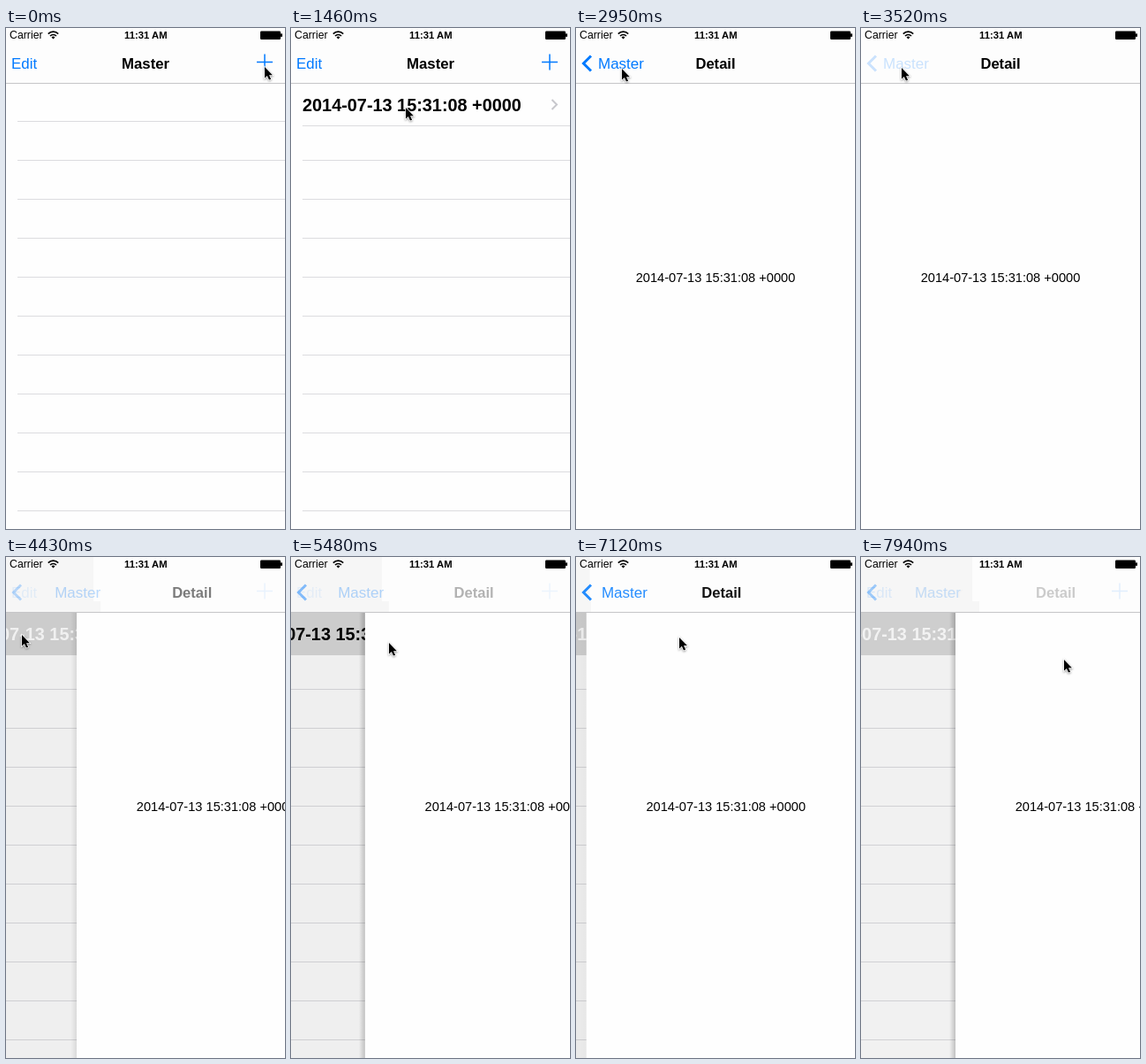
These frames come from a looping animation (316 px wide and 566 px high, 8 s). An HTML page:

```html
<!DOCTYPE html>
<html lang="en">
<head>
<meta charset="utf-8">
<title>Master and detail</title>
<style>
  html, body { margin: 0; width: 100%; height: 100%; overflow: hidden; background: #fefefe; }
  svg { display: block; width: 316px; height: 566px; }
  text { font-family: "Liberation Sans", Arial, sans-serif; white-space: pre; }
  .bold { font-weight: bold; }
  .blue { fill: #007aff; }
  .stroke { fill: none; stroke: #007aff; }
</style>
</head>
<body>
<svg viewBox="0 0 316 566">
  <defs>
    <linearGradient id="fade">
      <stop offset="0" stop-opacity="0"/>
      <stop offset="1" stop-opacity=".2"/>
    </linearGradient>
  </defs>

  <g id="list">
    <rect width="316" height="566" fill="#fefefe"/>
    <g id="lines" fill="#dcdcdf"></g>
    <g id="row">
      <rect id="mark" y="62" width="316" height="49" fill="#d9d9d9"/>
      <text id="stamp" class="bold" x="13" y="94" font-size="19.87">2014-07-13 15:31:08 +0000</text>
      <path d="M295.5 81l5.5 5.5-5.5 5.5" fill="none" stroke="#c7c7cc" stroke-width="2"/>
    </g>
  </g>
  <rect id="dim" width="316" height="566"/>

  <g id="page">
    <rect id="shadow" x="-7" width="7" height="566" fill="url(#fade)"/>
    <rect width="316" height="566" fill="#fefefe"/>
    <text x="67.7" y="287" font-size="14.6">2014-07-13 15:31:08 +0000</text>
  </g>

  <rect width="316" height="62" fill="#fdfdfd"/>
  <path id="tint" fill="#f6f6f6"/>
  <rect y="62" width="316" height="1" fill="#c6c6c8"/>

  <text x="4" y="12.3" font-size="12.3">Carrier</text>
  <path d="M47.8 6.6a8 8 0 0 1 11.4 0M50 9a5 5 0 0 1 7 0" fill="none" stroke="#000" stroke-width="1.7"/>
  <path d="M53.5 12.6l-2-2.2a2.8 2.8 0 0 1 4 0z"/>
  <text class="bold" x="134" y="12.2" font-size="11.3">11:31 AM</text>
  <rect x="288" y="3.5" width="23" height="9.5" rx="1.2"/>
  <rect x="311" y="6.3" width="2" height="3.6" rx=".7"/>

  <text id="edit" class="blue" x="6" y="46" font-size="16.9">Edit</text>
  <path id="plus" class="stroke" stroke-width="1.5" d="M284 38.5h18M293 29.5v18"/>
  <path id="chevron" class="stroke" stroke-width="3" d="M17 31.5L8.5 40l8.5 8.5"/>
  <text id="title" class="bold" y="46" font-size="16.8">Master</text>
  <text id="back" class="blue" y="46" font-size="17">Master</text>
  <text id="detail" class="bold" y="46" font-size="16.6" text-anchor="middle">Detail</text>

  <path id="cursor" d="M0 0v14l3.2-3 2.3 5.2 2.4-1-2.3-5h4.3z" stroke="#fff" stroke-width="1.6"
        paint-order="stroke" style="filter:drop-shadow(0 1px 1px #0006)"/>
</svg>

<script>
const LOOP = 8000, W = 316, SLIDE = 500;
const el = {};
document.querySelectorAll('[id]').forEach(e => el[e.id] = e);
const set = (e, attrs) => { for (const k in attrs) e.setAttribute(k, attrs[k]); };
const clamp = v => Math.min(1, Math.max(0, v));
const ramp = (t, a, b) => clamp((t - a) / (b - a));
const smooth = v => v * v * (3 - 2 * v);
const ease = t => 1 - (1 - clamp(t / SLIDE)) ** 5;

const lines = Array.from({ length: 11 }, () => {
  const r = document.createElementNS('http://www.w3.org/2000/svg', 'rect');
  set(r, { x: 13, width: W, height: 1 });
  return el.lines.appendChild(r);
});

// Interpolates rows of [time, ...values].
function track(keys, t, curve = v => v) {
  const i = keys.findIndex(k => k[0] > t);
  if (i < 0) return keys[keys.length - 1].slice(1);
  if (!i) return keys[0].slice(1);
  const a = keys[i - 1], b = keys[i], f = curve(ramp(t, a[0], b[0]));
  return a.slice(1).map((v, j) => v + (b[j + 1] - v) * f);
}

const POINTER = [
  [0, 293, 44], [600, 293, 44], [1100, 130, 90], [1460, 130, 90], [1900, 72, 86],
  [2100, 70, 84], [2230, 59, 47], [2600, 52, 46], [2950, 52, 46], [3400, 46, 45],
  [3640, 46, 45], [4140, 18, 88], [5180, 18, 88], [5480, 111, 97], [5760, 234, 109],
  [6060, 234, 109], [6061, 235, 109], [6230, 235, 109], [6470, 173, 88], [6930, 173, 88],
  [7400, 18, 96], [7560, 18, 96], [7940, 230, 116]
];
const SWIPE = [[5180, 0], [5480, 83], [5600, 190], [5700, 270], [5820, W]];
const SWIPE_AGAIN = [[7600, 0], [7760, 24], [7940, 107]];

// How far the detail screen is in, 0 to 1; the bar runs on its own start times.
function progress(t, first, second) {
  if (t < first) return 0;
  if (t < 3640) return ease(t - first);
  if (t < second) return 1 - ease(t - 3640);
  if (t < 5180) return ease(t - second);
  if (t < 5820) return 1 - track(SWIPE, t)[0] / W;
  if (t < 6880) return 0;
  if (t < 7600) return ease(t - 6880);
  return 1 - track(SWIPE_AGAIN, t)[0] / W;
}

const isPush = t => t < 3640 || t >= 4310 && t < 5180 || t >= 6820 && t < 7600;
const isPop = t => t >= 3640 && t < 4310 || t >= 5180 && t < 6820;

function selection(t) {
  if (t < 2060) return 0;
  if (t < 4310) return 1 - ramp(t, 3700, 4140);
  if (t < 6820) return 1 - ramp(t, 5500, 5820);
  return 1;
}

function drawList(t, p) {
  const grow = 5 * smooth(ramp(t, 530, 830));
  lines.forEach((r, i) => set(r, { y: 105 + 44 * i + (!i || t < 1040 ? grow : 0) }));
  const sel = selection(t);
  set(el.row, { opacity: ramp(t, 530, 800) });
  set(el.mark, { opacity: sel });
  set(el.stamp, { fill: sel && !isPop(t) ? '#fff' : '#000' });
  set(el.list, { transform: `translate(${-0.3 * W * p})` });
  set(el.dim, { opacity: 0.08 * p });
}

function drawBar(t, p, x) {
  const push = isPush(t);
  const press = t >= 3460 && t < 3640 ? 0.2 : 1;
  const left = 131 - 106 * p;
  const out = (1 - p) ** 2;
  set(el.title, { x: left, opacity: out * out });
  set(el.back, { x: left, opacity: p ** 4 * press });
  set(el.chevron, { opacity: p ** (push ? 4 : 2.5) * press });
  set(el.detail, { x: 158 + 185 * (1 - p), opacity: p ** (push ? 2 : 4) });
  set(el.edit, { opacity: out });
  set(el.plus, { opacity: out * (t >= 470 && t < 600 ? 0.3 : 1) });
  const grow = clamp(x / 60), edge = x + 19 * grow;
  set(el.tint, { d: `M0 0H${edge}V50H${edge + 8 * grow}V62H0z`, opacity: clamp(p * 1.4) });
}

function draw(t) {
  const p = progress(t, 2141, 4311), x = W * (1 - p);
  drawList(t, p);
  drawBar(t, progress(t, 2123, 4320), x);
  set(el.page, { transform: `translate(${x})`, visibility: p > 0 ? 'visible' : 'hidden' });
  set(el.shadow, { opacity: clamp(x / 80) * (isPush(t) ? 0.45 : 1) });
  const [cx, cy] = track(POINTER, t, smooth);
  set(el.cursor, { transform: `translate(${cx} ${cy}) scale(.9)` });
}

const start = performance.now();
function tick() {
  draw((performance.now() - start) % LOOP);
  requestAnimationFrame(tick);
}
tick();
</script>
</body>
</html>
```
